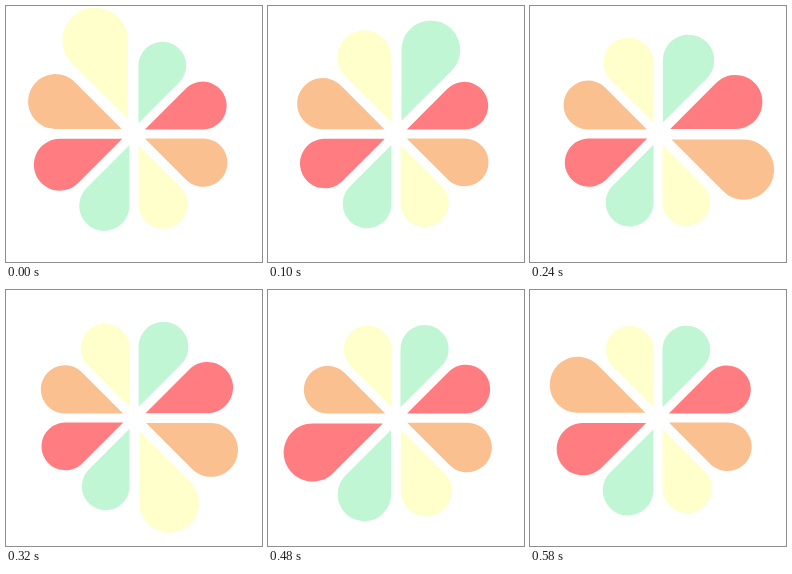
These frames come from a looping animation (256 px wide and 256 px high, 600 ms). An HTML page:

```html
<!DOCTYPE html>
<html lang="en">
<head>
<meta charset="utf-8">
<title>Petal loader</title>
<style>
  html, body { margin: 0; width: 100%; height: 100%; overflow: hidden; background: #fff; }
  svg { display: block; width: 100vw; height: 100vh; }
</style>
</head>
<body>
<svg viewBox="0 0 256 256"><g id="flower" transform="translate(128 128)"></g></svg>
<script>
  const LOOP = 600, TICK = 20, COUNT = 8;
  const COLORS = ['#ffffcb', '#c1f6d5', '#ff7c81', '#fac090'];
  const PETAL = 'M11.63 0L64.7 -21.98A23.8 23.8 0 1 1 64.7 21.98Z';

  const flower = document.getElementById('flower');
  const petals = Array.from({ length: COUNT }, (_, i) => {
    const path = document.createElementNS('http://www.w3.org/2000/svg', 'path');
    path.setAttribute('d', PETAL);
    path.setAttribute('fill', COLORS[i % COLORS.length]);
    return flower.appendChild(path);
  });

  // Each petal jumps to full size on its beat, then settles back.
  function petalScale(age) {
    return 1.001 + 0.374 * Math.pow(1 - Math.sqrt(age / LOOP), 2.1);
  }

  function draw(time) {
    const t = Math.floor(time / TICK + 0.01) * TICK % LOOP;
    petals.forEach((petal, i) => {
      // Later beats start just after their tick.
      const delay = i ? i * LOOP / COUNT + 0.1 : 0;
      const age = (t - delay + LOOP) % LOOP;
      const angle = -112.5 + i * 360 / COUNT;
      petal.setAttribute('transform', `rotate(${angle}) scale(${petalScale(age).toFixed(4)})`);
    });
  }

  const start = performance.now();
  function loop() {
    draw(Math.max(0, performance.now() - start));
    requestAnimationFrame(loop);
  }
  loop();
</script>
</body>
</html>
```
